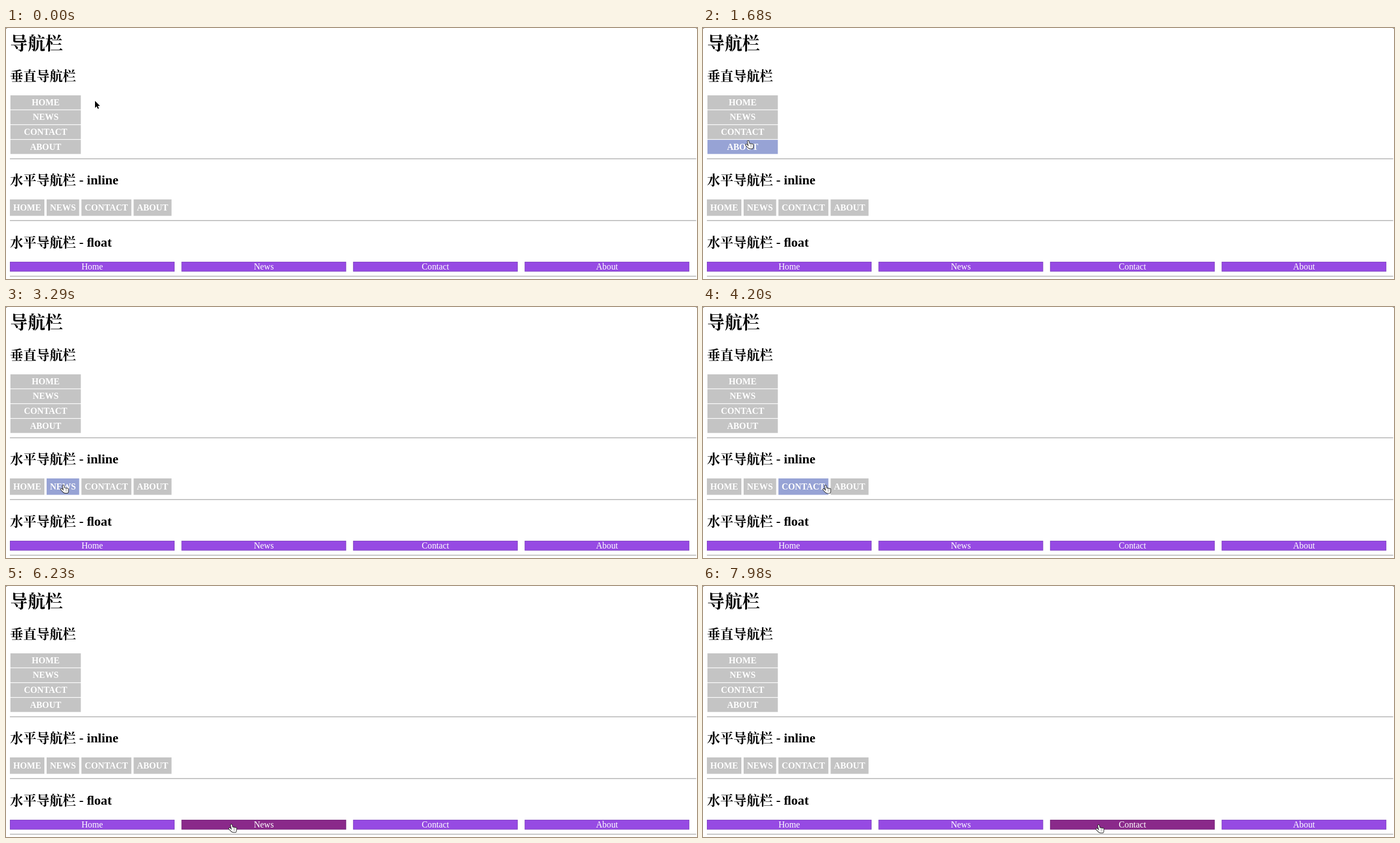
These frames come from a looping animation (1242 px wide and 451 px high, 8000 ms). An HTML page with a canvas:

```html
<!DOCTYPE html>
<html lang="zh-CN">
<head>
<meta charset="utf-8">
<title>导航栏</title>
<style>
html, body { margin: 0; width: 100%; height: 100%; overflow: hidden; background: #fff; }
canvas { display: block; }
</style>
</head>
<body>
<canvas id="stage" width="1242" height="451"></canvas>
<script>
const ctx = document.getElementById('stage').getContext('2d');
const LOOP = 8000, STEP = 70, LEFT = 7;
const LATIN = '"Liberation Serif", "Times New Roman", serif';
const CJK = '"Noto Serif CJK SC", "Noto Sans CJK SC", serif';
const SMALL = `15.8px ${LATIN}`;
const labels = ['Home', 'News', 'Contact', 'About'];

// Pointer stops: time, x, y.
const stops = [
  [0, 160, 131], [420, 125, 142], [700, 125, 142], [1050, 104, 168], [1540, 88, 184],
  [2380, 47, 294], [2730, 46, 321], [2940, 46, 321], [3850, 194, 318], [3990, 194, 318],
  [4480, 255, 323], [4830, 258, 398], [5390, 262, 428], [5460, 262, 428],
  [6440, 444, 428], [6580, 444, 428], [7000, 631, 438], [7420, 692, 441], [7980, 711, 429]
];

function makeButtons() {
  const list = [];
  let x = LEFT;
  ctx.font = `bold ${SMALL}`;
  labels.forEach((name, i) => {
    const text = name.toUpperCase(), w = ctx.measureText(text).width + 12, down = i * 26.65;
    list.push({ text, x: 8, y: 121 + down, w: 126.5, h: 25.4, base: 138.6 + down });
    list.push({ text, x, y: 308, w, h: 29.5, base: 328 });
    list.push({ text: name, x: LEFT + i * 308.4, y: 420, w: 296, h: 17.7, base: 434, bar: true });
    x += w + 4;
  });
  return list;
}
const buttons = makeButtons();

function pointer(t) {
  const i = Math.max(1, stops.findIndex(s => s[0] >= t));
  const [t0, x0, y0] = stops[i - 1], [t1, x1, y1] = stops[i];
  const u = (t - t0) / (t1 - t0);
  return [x0 + (x1 - x0) * u, y0 + (y1 - y0) * u];
}

function rect(color, x, y, w, h) {
  ctx.fillStyle = color;
  ctx.fillRect(x, y, w, h);
}

function text(str, x, y, font, color = '#000', align = 'left') {
  ctx.font = font;
  ctx.fillStyle = color;
  ctx.textAlign = align;
  ctx.fillText(str, x, y);
}

function heading(str, y, suffix = '') {
  text(str, LEFT + 0.3, y, `bold 23.7px ${CJK}`);
  text(suffix, 131.5, y - 1, `bold 23.7px ${LATIN}`);
}

function rule(y) {
  rect('#c4c4c4', LEFT, y, 1233.5, 2);
}

function drawButton(b, over) {
  if (b.bar) {
    rect(over ? '#742678' : '#8044c2', b.x, b.y, b.w, b.h);
    rect(over ? '#8a298a' : '#964ae3', b.x + 1, b.y + 1, b.w - 2, b.h - 2);
  } else {
    rect(over ? '#97a3d5' : '#c4c4c4', b.x, b.y, b.w, b.h);
  }
  text(b.text, b.x + b.w / 2, b.base, b.bar ? SMALL : `bold ${SMALL}`, '#fff', 'center');
}

const arrow = new Path2D('M0 0V12.5L3 9.8L5 14.3L7 13.4L5 9H9Z');

// Index finger, thumb, palm and three knuckles as round strokes.
const hand = new Path2D('M0 1.5L2 11M-3.2 7.8L1.5 12.5M3 13.2H7.4');
for (let k = 1; k < 4; k++) {
  hand.moveTo(0.5 + 2.5 * k, 5.8 + 0.5 * k);
  hand.lineTo(0.7 + 2.4 * k, 12);
}

function stroke(path, color, width) {
  ctx.strokeStyle = color;
  ctx.lineWidth = width;
  ctx.stroke(path);
}

function drawPointer(x, y, isHand) {
  ctx.save();
  ctx.translate(x, y);
  ctx.lineJoin = ctx.lineCap = 'round';
  if (isHand) {
    stroke(hand, '#222', 4);
    stroke(hand, '#fff', 2.1);
  } else {
    stroke(arrow, '#fff', 2);
    ctx.fillStyle = '#000';
    ctx.fill(arrow);
  }
  ctx.restore();
}

function draw(t) {
  const [x, y] = pointer(Math.floor(t / STEP) * STEP);
  const inside = b => x >= b.x && x < b.x + b.w && y >= b.y && y < b.y + b.h;
  rect('#fff', 0, 0, 1242, 451);
  rect('#777', 0, 0, 2, 1);
  rect('#777', 1240, 0, 2, 1);
  text('导航栏', LEFT + 0.5, 38.5, `bold 31.5px ${CJK}`);
  heading('垂直导航栏', 95);
  heading('水平导航栏', 282, '- inline');
  heading('水平导航栏', 394, '- \uFB02oat');
  [234, 345, 445].forEach(rule);
  buttons.forEach(b => drawButton(b, inside(b)));
  drawPointer(x, y, buttons.some(inside));
}

const start = performance.now();
function tick() {
  draw((performance.now() - start) % LOOP);
  requestAnimationFrame(tick);
}
tick();
</script>
</body>
</html>
```
